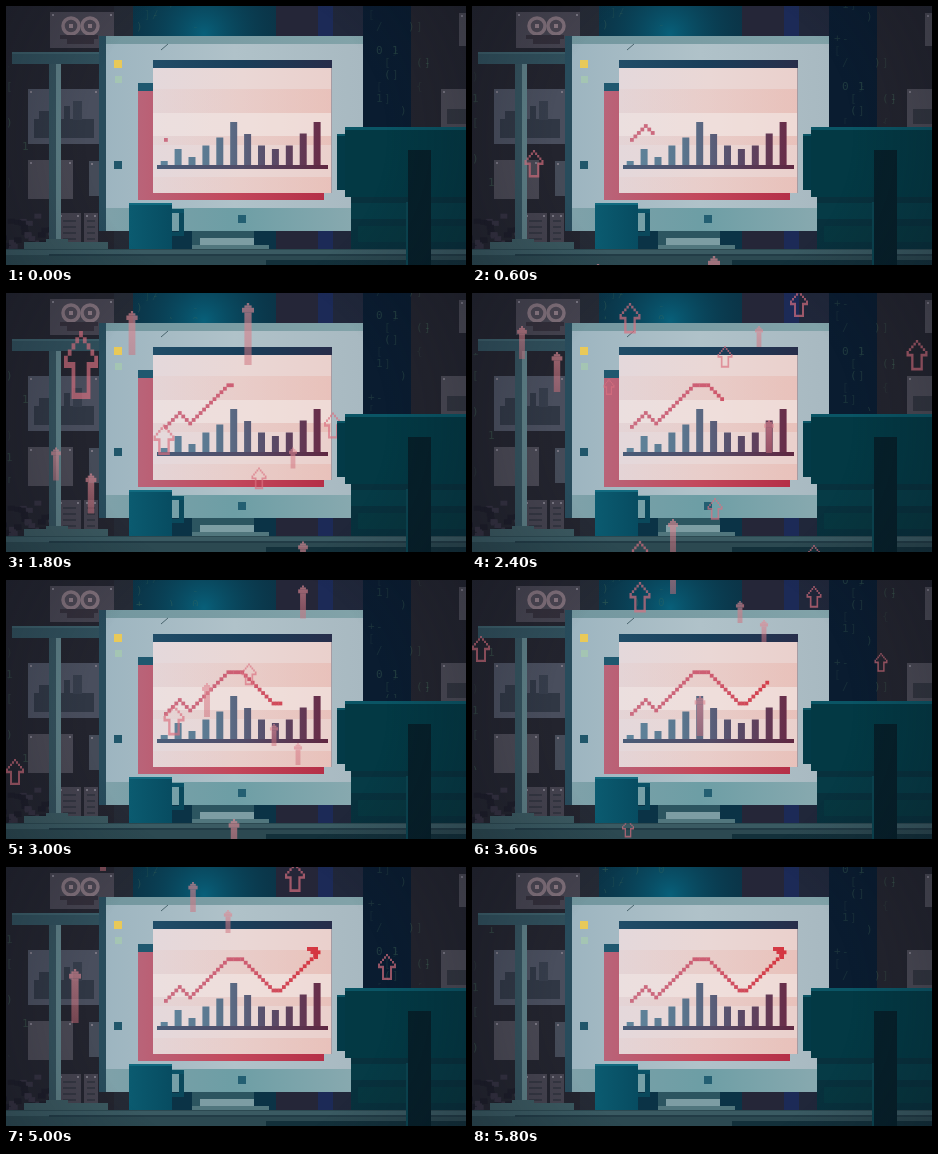
These frames come from a looping animation (460x259 px, 6 s). An HTML page with a canvas:

```html
<!DOCTYPE html>
<html lang="en">
<head>
<meta charset="utf-8">
<title>Rising chart</title>
<style>
html, body { margin: 0; width: 100%; height: 100%; overflow: hidden; background: #20212b; }
canvas { display: block; width: 460px; height: 259px; }
</style>
</head>
<body>
<canvas id="stage" width="460" height="259"></canvas>
<script>
const W = 460, H = 259, LOOP = 6000, STEP = 200, CELL = 3.47;
const ctx = document.getElementById('stage').getContext('2d');

function box(c, x, y, x2, y2, fill) {
  c.fillStyle = fill;
  c.fillRect(x, y, x2 - x, y2 - y);
}

function ramp(c, x, y, x2, y2, ...colors) {
  const g = c.createLinearGradient(x, y, x2, y2);
  colors.forEach((col, i) => g.addColorStop(i / (colors.length - 1), col));
  return g;
}

const across = (c, x, x2, ...colors) => ramp(c, x, 0, x2, 0, ...colors);

function glow(c, x, y, r, from, to) {
  const g = c.createRadialGradient(x, y, 0, x, y, r);
  g.addColorStop(0, from);
  g.addColorStop(1, to);
  return g;
}

function random(seed) {
  return () => {
    seed = (seed * 16807 + 11) % 2147483647;
    return seed / 2147483647;
  };
}

function layer(draw) {
  const el = document.createElement('canvas');
  el.width = W;
  el.height = H;
  draw(el.getContext('2d'));
  return el;
}

function paper(c, x, y, x2, y2, fill = '#45434f') {
  box(c, x, y, x2, y2, fill);
  box(c, x + 2, y + 2, x + 4, y + 4, '#777480');
  box(c, x2 - 4, y + 2, x2 - 2, y + 4, '#777480');
}

function wall(c) {
  box(c, 0, 0, W, H, '#23242e');
  box(c, 108, 0, 127, H, '#252a35');
  box(c, 127, 0, 270, H, '#0b3346');
  box(c, 127, 0, 270, 60, glow(c, 198, 28, 85, '#08607a', 'rgba(8,60,80,0)'));
  box(c, 270, 0, 312, H, '#252638');
  box(c, 312, 0, 327, H, '#1c2a57');
  box(c, 327, 0, 357, H, '#20273a');
  box(c, 357, 0, 405, H, '#0a1c30');

  paper(c, 44, 6, 108, 42);
  c.lineWidth = 3.5;
  c.strokeStyle = '#80707a';
  for (const x of [65, 84]) {
    c.beginPath();
    c.arc(x, 20, 8, 0, 7);
    c.fillStyle = '#4b4652';
    c.fill();
    c.stroke();
    box(c, x - 2, 18, x + 2, 22, '#8b7983');
  }
  box(c, 54, 29, 92, 33, '#332f3a');
  box(c, 61, 33, 88, 38, '#332f3a');

  paper(c, 22, 83, 93, 138, '#494e5d');
  box(c, 28, 113, 88, 132, '#303744');
  box(c, 33, 105, 46, 116, '#303744');
  box(c, 58, 100, 64, 114, '#303744');
  box(c, 67, 95, 76, 114, '#363d4b');
  paper(c, 22, 154, 67, 193, '#494853');
  paper(c, 83, 155, 97, 190, '#454b58');
  paper(c, 52, 207, 75, 240);
  paper(c, 78, 207, 92, 240);
  for (let y = 214; y < 236; y += 6) {
    box(c, 57, y, 70, y + 2, '#343641');
    box(c, 81, y, 89, y + 2, '#343641');
  }
  paper(c, 435, 83, 470, 125, '#4a4954');
  box(c, 441, 103, W, 118, '#32353f');
  paper(c, 453, 7, 475, 40, '#4a4954');

  // plant
  const rnd = random(19);
  for (let i = 0; i < 34; i++) {
    const a = Math.PI * (1 + rnd()), r = 10 + rnd() * 24;
    const x = 18 + Math.cos(a) * r * .8, y = 240 + Math.sin(a) * r * 1.1;
    box(c, x, y, x + 7, y + 5, i % 3 ? '#1d1d29' : '#343140');
  }
}

function shelf(c) {
  box(c, 6, 46, 95, 58, '#304f5b');
  box(c, 6, 46, 95, 48, '#3b5d68');
  box(c, 43, 58, 50, 238, '#34515c');
  box(c, 50, 58, 55, 238, '#5d7e85');
  box(c, 18, 236, 102, 243, '#3b5960');
  box(c, 40, 233, 62, 237, '#3b5960');
}

function monitor(c) {
  box(c, 93, 30, 101, 225, '#284c5c');
  box(c, 100, 30, 357, 225, across(c, 100, 357, '#9db5c0', '#b0c2c9', '#a8b9c1'));
  box(c, 100, 30, 357, 38, across(c, 100, 357, '#73979f', '#82a3a9'));
  box(c, 100, 202, 357, 225, across(c, 100, 357, '#7fa1a9', '#6d9ea5', '#8aaab0'));
  box(c, 108, 54, 116, 62, '#e9c958');
  box(c, 109, 70, 116, 77, '#a4c5b3');
  box(c, 108, 155, 116, 163, '#20566a');
  box(c, 232, 209, 240, 217, '#235f72');
  c.strokeStyle = '#49646d';
  c.lineWidth = 1;
  c.beginPath();
  c.moveTo(155, 44);
  c.lineTo(162, 38);
  c.stroke();

  box(c, 132, 77, 318, 194, across(c, 132, 318, '#b96479', '#c3485c', '#b52f47'));
  box(c, 132, 77, 147, 85, '#1f586f');
  box(c, 147, 62, 326, 187, across(c, 147, 326, '#e4d8db', '#ead7d5', '#ead0cc'));
  const band = across(c, 147, 326, 'rgba(229,190,185,.15)', 'rgba(231,181,172,.55)');
  box(c, 147, 83, 326, 107, band);
  box(c, 147, 130, 326, 139, band);
  box(c, 147, 171, 326, 187, band);
  box(c, 147, 107, 326, 130, 'rgba(246,233,228,.4)');
  box(c, 147, 54, 326, 62, across(c, 147, 326, '#204d68', '#193e59', '#272d4a'));
  box(c, 325, 62, 326, 187, '#a69ca3');

  const tint = across(c, 151, 322, '#60859c', '#5b7890', '#584b68', '#6b2944');
  [155, 143, 151, 139.5, 131.5, 116, 128, 139.5, 143, 139.5, 127.5, 116].forEach((y, i) => {
    const x = 154.7 + i * 13.9;
    box(c, x, y, x + 7, 160, tint);
  });
  box(c, 151, 159, 322, 163, across(c, 151, 322, '#495c78', '#514b67', '#5f2741'));
}

function desk(c) {
  box(c, 186, 225, 248, 243, '#2c5560');
  box(c, 194, 232, 248, 241, '#7d9da3');
  box(c, 186, 239, 263, 244, '#51767d');
  box(c, 0, 243, W, H, '#2c4951');
  box(c, 0, 244, W, 249, '#3a5a62');
  box(c, 43, 248, W, 250, '#223c46');
  box(c, 260, 254, W, H, '#13303a');
}

function front(c) {
  // mug
  box(c, 123, 197, 166, 243, across(c, 123, 166, '#0b5b70', '#074c61'));
  box(c, 123, 197, 166, 199, '#126b80');
  box(c, 166, 203, 178, 207, '#0b5266');
  box(c, 173, 207, 178, 230, '#0a485b');
  box(c, 166, 226, 176, 230, '#0a485b');

  // chair
  box(c, 345, 190, W, 243, '#08313d');
  box(c, 345, 197, W, 213, '#063b46');
  box(c, 352, 220, W, 236, '#073740');
  box(c, 331, 128, W, 184, '#033a47');
  box(c, 339, 121, W, 191, '#033944');
  box(c, 339, 121, W, 124, '#0a5565');
  box(c, 331, 128, 339, 130, '#0a5565');
  box(c, 402, 144, 425, H, '#06202a');
  box(c, 400, 196, 402, H, '#0b4652');
}

const back = layer(c => [wall, shelf, monitor, desk].forEach(f => f(c)));
const near = layer(front);
const shade = layer(c => {
  const g = c.createRadialGradient(230, 130, 150, 230, 130, 290);
  g.addColorStop(0, 'rgba(10,14,24,0)');
  g.addColorStop(1, 'rgba(10,14,24,.3)');
  box(c, 0, 0, W, H, g);
});

// Faint falling code beside the monitor
function code(step, seed, x, y, w, h, n) {
  const rnd = random(seed), glyphs = '01{}()[]/+-';
  ctx.save();
  ctx.beginPath();
  ctx.rect(x, y, w, h);
  ctx.clip();
  ctx.font = '11px "DejaVu Sans Mono", monospace';
  for (let i = 0; i < n; i++) {
    const gx = x + Math.floor(rnd() * w / 8) * 8;
    const gy = y + (Math.floor(rnd() * h / 12) * 12 + step * 12) % (h + 12);
    const ch = glyphs[Math.floor(rnd() * glyphs.length)];
    ctx.fillStyle = `rgba(70,110,90,${.15 + rnd() * .3})`;
    ctx.fillText(ch, gx, gy);
  }
  ctx.restore();
}

function outline(x, y, w, h) {
  const u = w / 9, v = h / 11;
  const cell = (col, row, cols = 1, rows = 1) => {
    ctx.rect(x + (col - .5) * u, y + row * v, cols * u, rows * v);
  };
  ctx.fillStyle = 'rgba(218,112,128,.68)';
  ctx.beginPath();
  cell(0, 0);
  for (let i = 1; i < 5; i++) {
    cell(-i, i);
    cell(i, i);
  }
  cell(-4, 5, 3);
  cell(2, 5, 3);
  cell(-2, 6, 1, 4);
  cell(2, 6, 1, 4);
  cell(-2, 10, 5);
  ctx.fill();
}

function solid(x, y, w, h) {
  const u = w / 5;
  const fill = ramp(ctx, 0, y, 0, y + h, 'rgba(226,140,151,.65)', 'rgba(205,110,122,.5)');
  const part = (half, from, to) => box(ctx, x - half, from, x + half, to, fill);
  part(u / 2, y, y + u);
  part(u * 1.5, y + u, y + u * 2);
  part(u * 2.5, y + u * 2, y + u * 4);
  part(u * 1.5, y + u * 4, y + h);
}

// Each wave rises at its own pace and passes its given tops at step `at`
function wave(step, at, rise, open, filled) {
  const lift = (step - at) * rise;
  for (const [x, top, w, h = w * 1.45] of open) outline(x, top - lift, w, h);
  for (const [x, top, h] of filled) solid(x, top - lift, Math.min(12, 5 + h / 7), h);
}

function arrows(step) {
  wave(step, 6, 40, [[62, 24, 19], [75, 158, 34, 68]], [[126, 138, 44], [242, 130, 62]]);
  wave(step, 12, 40.5,
    [[158, 10, 21], [327, -2, 18], [445, 47, 21], [253, 53, 15], [137, 86, 11], [243, 205, 15]],
    [[287, 33, 21], [50, 33, 33], [85, 59, 40], [297, 127, 33]]);
  wave(step, 18, 41,
    [[168, 2, 21], [342, 6, 15], [409, 73, 13], [9, 56, 18]],
    [[268, 21, 22], [292, 40, 22], [201, -20, 34], [228, 116, 40]]);
  wave(step, 22, 48, [[149, 5, 12], [156, 48, 12]], [[222, 187, 23]]);
  wave(step, 25, 42, [[289, -4, 20], [381, 87, 18]], [[97, -31, 35], [69, 102, 54], [187, 15, 30]]);
}

function along(points, x) {
  for (let i = 1; i < points.length; i++) {
    const [a, b] = points[i - 1], [c, d] = points[i];
    if (x <= c) return b + (d - b) * (x - a) / (c - a);
  }
  return points[points.length - 1][1];
}

const trend = [[0, 0], [4, 4], [7, 1], [18, 12], [22, 12], [31, 3], [33, 3], [44, 14]];
const pace = [[0, 1], [6, 12], [12, 27], [18, 40], [21, 45]];

function line(step) {
  const n = Math.round(along(pace, step));
  ctx.fillStyle = across(ctx, 158, 312, '#cb6e82', '#cd5d72', '#d5353f');
  for (let i = 0; i < n; i++)
    ctx.fillRect(158 + i * CELL, 132 - Math.round(along(trend, i)) * CELL, 3.8, 3.8);
  if (step > 20) {
    ctx.fillRect(301, 80, 11, 4);
    ctx.fillRect(308, 80, 4, 12);
    ctx.fillRect(304.5, 83, 5, 4);
  }
}

function draw(now) {
  const step = Math.floor(now % LOOP / STEP);
  ctx.drawImage(back, 0, 0);
  code(step, 77, 362, 0, 70, 118, 20);
  code(step, 31, 130, 0, 125, 26, 8);
  code(step, 53, 0, 60, 22, 130, 6);
  line(step);
  arrows(step);
  ctx.drawImage(near, 0, 0);
  ctx.drawImage(shade, 0, 0);
}

const start = performance.now();
function tick() {
  draw(performance.now() - start);
  requestAnimationFrame(tick);
}
tick();
</script>
</body>
</html>
```
